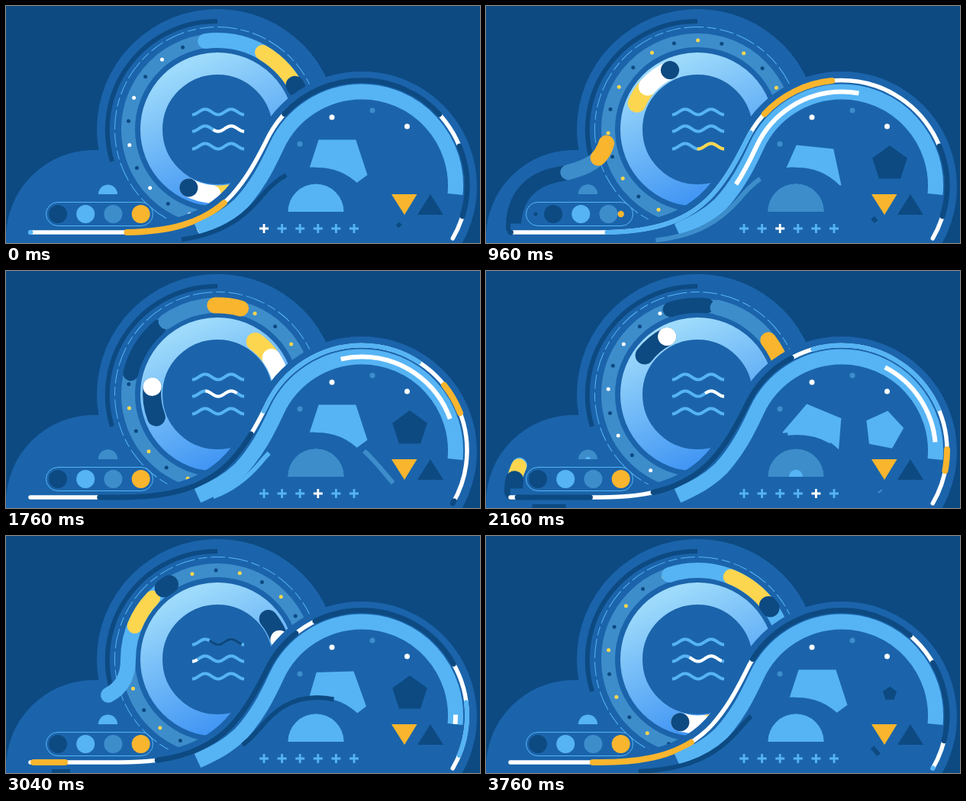
Write an HTML page that moves like this. It is 621x311 px and loops after 3840 ms.

```html
<!DOCTYPE html>
<html lang="en">
<head>
<meta charset="utf-8">
<title>Cloud tracks</title>
<style>
html, body { margin: 0; width: 100%; height: 100%; overflow: hidden; background: #0d4a82; }
svg { display: block; width: 621px; height: 311px; }
</style>
</head>
<body>
<svg id="stage" viewBox="0 0 621 311" fill="none"></svg>
<script>
const NS = 'http://www.w3.org/2000/svg';
const LOOP = 3840, TICK = 80, TICKS = LOOP / TICK, HALF = TICKS / 2;
const DARK = '#0d4a82', CLOUD = '#1b64ab', MID = '#3d8dcb', LIGHT = '#56b4f4',
      GOLD = '#f9b52e', LEMON = '#fdd650', WHITE = '#fff';
const stage = document.getElementById('stage');
const updates = [];

const clamp = u => Math.min(1, Math.max(0, u));
const linear = u => u;
const smooth = u => u * u * (3 - 2 * u);
const out = p => u => 1 - (1 - u) ** p;
const slowing = out(1.5);

function set(el, attrs) {
  for (const k in attrs) el.setAttribute(k, attrs[k]);
}
function add(tag, attrs, parent = stage) {
  const el = document.createElementNS(NS, tag);
  set(el, attrs);
  return parent.appendChild(el);
}
const circle = (cx, cy, r, fill) => add('circle', { cx, cy, r, fill });
const line = (d, stroke, width, more = {}) =>
  add('path', { d, stroke, 'stroke-width': width, ...more });
const ROUND = { 'stroke-linecap': 'round' };

// An end of a piece runs the whole path from tick t0 to tick t1.
const edge = (t0, t1, ease = linear) => ({ t0, t1, at: n => ease(clamp((n - t0) / (t1 - t0))) });

// A piece of a path between two moving ends.
function runner(d, color, width, back, front, more = {}) {
  const el = line(d, color, width, more);
  const total = more.pathLength || el.getTotalLength();
  updates.push(n => {
    const m = [n - TICKS, n, n + TICKS].find(t => t > front.t0 && t < back.t1);
    const from = m === undefined ? 0 : total * back.at(m);
    const len = m === undefined ? 0 : total * front.at(m) - from;
    set(el, {
      visibility: len > 0 ? 'visible' : 'hidden',
      'stroke-dasharray': Math.max(len, 0.01) + ' 3000',
      'stroke-dashoffset': -from
    });
  });
}

function pentagon(x, y, r, deg) {
  return Array.from({ length: 5 }, (_, i) => {
    const a = (deg + i * 72 - 90) * Math.PI / 180;
    return (x + r * Math.cos(a)).toFixed(2) + ',' + (y + r * Math.sin(a)).toFixed(2);
  }).join(' ');
}

// Cloud
circle(115, 304, 115, CLOUD);
circle(277, 162, 158, CLOUD);
circle(466, 237, 151, CLOUD);
add('path', { d: 'M115 189H180V311H0V304Z M150 240H500V311H150Z', fill: CLOUD });
line('M277 20A142.5 142.5 0 0 0 139 204', DARK, 6);

// Dial
const dashes = add('circle', {
  cx: 277, cy: 162, r: 134.5, stroke: LIGHT, 'stroke-width': 1,
  pathLength: 360, 'stroke-dasharray': '11 2 5 2 8 2'
});
updates.push(n => set(dashes, { transform: `rotate(${-30 * n / TICKS} 277 162)` }));
add('circle', { cx: 277, cy: 162, r: 117, stroke: MID, 'stroke-width': 18 });

for (let k = -3; k <= 17; k++) {
  const dot = circle(0, 0, 2.5, DARK), even = k % 2 === 0;
  updates.push(n => {
    const a = (4.7 + 30.9 * n / TICKS + 15.45 * k) * Math.PI / 180;
    const first = n % HALF < HALF / 2;
    set(dot, {
      cx: 277 + 117 * Math.cos(a), cy: 162 - 117 * Math.sin(a),
      fill: first && even ? WHITE : !first && !even ? LEMON : DARK
    });
  });
}

const grad = add('linearGradient', { id: 'sky', x1: 0.3, y1: 0, x2: 0.75, y2: 1 }, add('defs', {}));
add('stop', { offset: 0, 'stop-color': '#9ddafb' }, grad);
add('stop', { offset: 1, 'stop-color': '#3a90f3' }, grad);
add('circle', { cx: 277, cy: 162, r: 86.5, stroke: 'url(#sky)', 'stroke-width': 29 });

// Capsules on the inner ring
const INNER = 'M351.9 205.25A86.5 86.5 0 0 1 202.1 118.75A86.5 86.5 0 0 1 351.9 205.25';
const ring = (color, back, front) => runner(INNER, color, 24, back, front, ROUND);
ring(LEMON, edge(-4.9, 30.3), edge(-6.2, 28.2));
ring(WHITE, edge(-6.2, 28.2), edge(-8, 25.5));
ring(DARK, edge(-7.99, 25.51), edge(-8, 25.5));
ring(DARK, edge(12, 51, slowing), edge(10, 48, slowing));
ring(WHITE, edge(10.01, 48.01, slowing), edge(10, 48, slowing));

// Capsules climbing onto the dial
const CLIMB = 'M36 290C36 250 60 228 90 222C130 214 160 205 160 162A117 117 0 0 1 277 45A117 117 0 0 1 394 162';
const climb = (color, back, front, width = 20) => runner(CLIMB, color, width, back, front, ROUND);
climb(DARK, edge(12.6, 36.2), edge(6.5, 36));
climb(MID, edge(6.3, 35), edge(4.3, 28.6));
climb(GOLD, edge(4.9, 30.5), edge(4.3, 28.6), 21);
climb(LIGHT, edge(32, 58.2, out(1.1)), edge(25.5, 49));
climb(LEMON, edge(28.5, 59, slowing), edge(25.5, 50.2));
climb(DARK, edge(27, 54.2, slowing), edge(26.5, 54, slowing), 24);

// Front hill and the outer track
const TRACK = 'M32 297H150C215 297 262 285 296 248C314 228 326 207 340.9 177.2' +
  'A138 138 0 0 1 466 97.5A138 138 0 0 1 585.3 304.9';
line(TRACK, CLOUD, 23, { fill: CLOUD });
add('path', { d: 'M296 248L341 177L585 305V311H200V290Z', fill: CLOUD });
line(TRACK, WHITE, 5.5, ROUND);
const track = (color, start, width, front = edge(start, start + 45, out(2))) =>
  runner(TRACK, color, width, edge(start, start + TICKS, smooth), front, ROUND);
track(DARK, 12, 7);
track(DARK, 24, 7);
track(LIGHT, 0, 6);
track(GOLD, 36, 8, edge(36, 79, out(1.2)));

// Wide road with a white stripe
const ROAD = 'M251 295C275 284 292 275 308 259C328 237 340 215 354.5 183.9' +
  'A123 123 0 0 1 466 112.5A123 123 0 0 1 588.5 247';
line(ROAD, LIGHT, 20);
runner(ROAD, WHITE, 6, edge(0, 42, smooth), edge(0, 42, out(3)));

// Polygon resting above the dome, cut by its arc; it dips and turns once each half loop
add('path', { d: 'M380 150H490V242L463 235Q440 212 408 212Q398 210 380 215Z' },
  add('clipPath', { id: 'above' }));
const block = add('polygon', { fill: LIGHT, 'clip-path': 'url(#above)' });
updates.push(n => {
  const u = clamp(n % HALF / 16), dip = Math.sin(Math.PI * u) ** 2;
  const turn = (n < HALF ? 1 : -1) * (36 - 72 * out(1.8)(u));
  set(block, { points: pentagon(434 - 13 * dip, 209 + 19 * dip, 41.5, turn) });
});

// Small pentagon
const gem = add('polygon', {});
updates.push(n => {
  const u = clamp(n % HALF / 12), swell = Math.sin(Math.PI * u);
  const size = clamp(n / 5) * clamp((TICKS - n) / 2.5);
  set(gem, {
    points: pentagon(529 - 11 * swell, 207 + 3 * swell, (24 + 3 * swell) * size, 72 * smooth(u)),
    fill: u < 1 ? LIGHT : DARK
  });
});

// Half domes, refilled from the middle each half loop
function dome(x, y, r) {
  const half = s => `M${x - s} ${y}A${s} ${s} 0 0 1 ${x + s} ${y}Z`;
  const base = add('path', { d: half(r) }), core = add('path', {});
  updates.push(n => {
    const first = n < HALF, s = r * clamp(n % HALF / 12);
    set(base, { fill: first ? LIGHT : MID });
    set(core, { fill: first ? MID : LIGHT, d: s > 0 ? half(s) : '' });
  });
}
dome(406, 270, 36.5);
dome(133.5, 247, 12.5);

// Inner track
const PATH = 'M60 309H190C262 309 302 288 332 253C353 227 375 212 408 212C445 212 468 232 490 258L517 290';
const inner = (color, back, front) =>
  runner(PATH, color, 6, edge(...back, smooth), edge(...front, out(2)));
inner(MID, [2.5, 28], [3, 26]);
inner(LIGHT, [11, 36], [13.5, 37]);
inner(DARK, [26.6, 49.5], [26, 49]);
inner(DARK, [39, 62.5], [37.4, 63.5]);

// Waves
function wave(y, color, starts) {
  let d = '';
  for (let x = 0; x <= 68; x++)
    d += (x ? 'L' : 'M') + (244 + x) + ' ' + (y + 3.5 * Math.cos(x * Math.PI / 17)).toFixed(2);
  line(d, LIGHT, 4);
  starts.forEach(t => runner(d, color, 4, edge(t + 5.7, t + 18.8), edge(t, t + 10.5)));
}
wave(139, DARK, [28]);
wave(161, WHITE, [13, 13 + HALF]);
wave(184, LEMON, [0]);

// Pill with sliding discs
add('rect', { x: 52.5, y: 257.5, width: 140, height: 31, rx: 15.5, stroke: LIGHT, 'stroke-width': 1 });
const spare = circle(65, 273, 0, DARK);
const discs = [DARK, LIGHT, MID, GOLD].map(color => circle(0, 273, 12, color));
updates.push(n => {
  const u = Math.sin(Math.PI * clamp((n - 10) / 10));
  set(spare, { r: 4.4 * u });
  discs.forEach((disc, i) => set(disc, { cx: 68 + 36.2 * i + 34 * u }));
  set(discs[3], { cx: 176.7, r: 12 * clamp(1 - 1.1 * u) });
});

// Fixed marks
add('path', { d: 'M505 247H538.5L522 274Z', fill: GOLD });
add('path', { d: 'M556 247L573 274H539Z', fill: DARK });
circle(427, 146, 3.5, WHITE);
circle(525.5, 158, 3.5, WHITE);
circle(480, 137, 3.5, MID);
circle(385, 181, 3.5, MID);

// Pluses lit in turn
for (let i = 0; i < 6; i++) {
  const plus = line(`M${332 + 23.6 * i} 292h12m-6 -6v12`, LIGHT, 2.8);
  updates.push(n => set(plus, { stroke: Math.floor(n / 6) === i ? WHITE : LIGHT }));
}

const start = performance.now();
function draw(now) {
  const n = (Math.max(0, now - start) % LOOP) / TICK;
  updates.forEach(update => update(n));
  requestAnimationFrame(draw);
}
draw(start);
</script>
</body>
</html>
```
